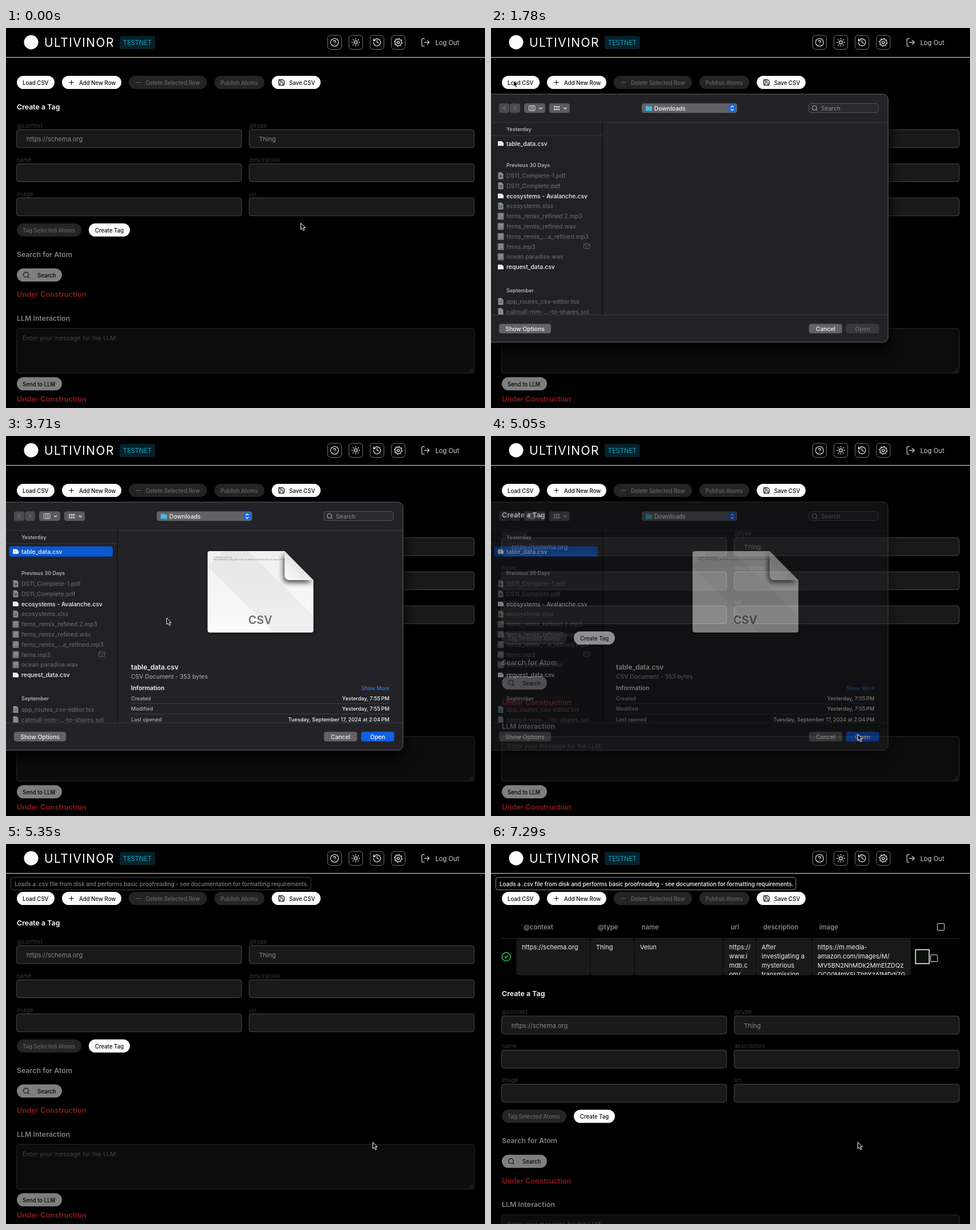
An HTML page that plays this animation: 839x667 px, repeating every 8000 ms.

```html
<!DOCTYPE html>
<html lang="en">
<head>
<meta charset="utf-8">
<title>CSV editor</title>
<style>
  html, body { margin: 0; width: 100%; height: 100%; overflow: hidden; background: #000; }
  svg { display: block; width: 839px; height: 667px; font-family: Inter, "Open Sans", sans-serif; }
  .icon { fill: none; stroke-width: 2; stroke-linecap: round; stroke-linejoin: round; }
  .panel { filter: drop-shadow(0 12px 12px #000); }
  .sheet { filter: drop-shadow(0 1px 2px rgba(0, 0, 0, .6)); }
  .flap { filter: drop-shadow(-2px 4px 5px rgba(0, 0, 0, .75)); }
</style>
</head>
<body>
<svg id="stage" viewBox="0 0 839 667" xmlns="http://www.w3.org/2000/svg"></svg>
<script>
const STEP = 148.6, LOOP = 8000;

// Drawing helpers; y of a text is the middle of its capitals.
const text = (x, y, s, size, fill, weight = 400, extra = '') =>
  `<text x="${x}" y="${y + size * 0.364}" font-size="${size}" fill="${fill}" font-weight="${weight}" ${extra}>${s}</text>`;
const rect = (x, y, w, h, r, fill, extra = '') =>
  `<rect x="${x}" y="${y}" width="${w}" height="${h}" rx="${r}" fill="${fill}" ${extra}/>`;
const path = (d, stroke, width = 1) =>
  `<path d="${d}" fill="none" stroke="${stroke}" stroke-width="${width}"/>`;
const icon = (cx, cy, size, stroke, body) =>
  `<g class="icon" stroke="${stroke}" transform="translate(${cx} ${cy}) scale(${size / 24}) translate(-12 -12)">${body}</g>`;
const group = (id, body) => `<g id="${id}">${body}</g>`;
const p = d => `<path d="${d}"/>`;
const ring = (r, c = 12) => `<circle cx="${c}" cy="${c}" r="${r}"/>`;

const gear = () => {
  const pts = [];
  for (let i = 0; i < 32; i++) {
    const a = (i + 0.5) * Math.PI / 16, r = i % 4 < 2 ? 10 : 7.6;
    pts.push(`${(12 + r * Math.sin(a)).toFixed(2)} ${(12 - r * Math.cos(a)).toFixed(2)}`);
  }
  return p(`M${pts.join('L')}Z`) + ring(3);
};

const icons = {
  help: ring(10) + p('M9.1 9a3 3 0 0 1 5.8 1c0 2-3 3-3 3M12 17h.01'),
  sun: ring(4) + p('M12 2v2M12 20v2M4.9 4.9l1.4 1.4M17.7 17.7l1.4 1.4M2 12h2M20 12h2M6.3 17.7l-1.4 1.4M19.1 4.9l-1.4 1.4'),
  history: p('M3 12a9 9 0 1 0 9-9 9.75 9.75 0 0 0-6.7 2.7L3 8M3 3v5h5M12 7v5l4 2'),
  gear: gear(),
  logout: p('M9 21H5a2 2 0 0 1-2-2V5a2 2 0 0 1 2-2h4M16 17l5-5-5-5M21 12H9'),
  save: p('M19 21H5a2 2 0 0 1-2-2V5a2 2 0 0 1 2-2h11l5 5v11a2 2 0 0 1-2 2zM17 21v-8H7v8M7 3v5h8'),
  search: ring(8, 11) + p('M21 21l-4.3-4.3'),
  plus: p('M5 12h14M12 5v14'),
  minus: p('M5 12h14'),
  loader: p('M21 12a9 9 0 1 1-6.2-8.56'),
  check: ring(10) + p('M8.5 12l2.5 2.5 5-5')
};

const looks = { light: ['#fff', '#0a0a0a'], off: ['#242424', '#686868'], dim: ['#7f7f7f', '#050505'] };
const pill = (x, y, w, label, look, tx, mark, id = '') => {
  const [bg, fg] = looks[look];
  return rect(x, y, w, 23, 11.5, bg, id && `id="${id}"`) +
    (mark ? icon(mark[1], y + 11.5, mark[2], fg, icons[mark[0]]) : '') +
    text(tx, y + 12, label, 9.65, fg, 500);
};

function header() {
  const tools = ['help', 'sun', 'history', 'gear'].map((name, i) => {
    const x = 575.5 + i * 37.2;
    return rect(x - 12, 13, 24, 24.5, 5, 'none', 'stroke="#777"') + icon(x, 25.2, 16.5, '#d8d8d8', icons[name]);
  }).join('');
  return '<circle cx="44" cy="25" r="12.5" fill="#fff"/>' +
    text(67, 25.3, 'ULTIVINOR', 21, '#fff', 400, 'letter-spacing="1.4"') +
    rect(199, 14, 62, 23, 4, '#06222b') + text(205, 26, 'TESTNET', 11.1, '#0fa5c4') +
    tools + icon(735, 25.3, 17.5, '#b8b8b8', icons.logout) + text(752, 26, 'Log Out', 11.2, '#d2d2d2') +
    rect(0, 51, 839, 1, 0, '#dcdcdc');
}

const toolbar = () =>
  pill(19, 84, 66, 'Load CSV', 'light', 29, null, 'load') +
  pill(98, 84, 104, 'Add New Row', 'light', 128, ['plus', 114.5, 13]) +
  pill(215, 84, 137, 'Delete Selected Row', 'off', 245, ['minus', 232, 14]) +
  pill(365, 84, 87.5, 'Publish Atoms', 'off', 375.5) +
  pill(465.5, 84, 85.5, 'Save CSV', 'light', 496, ['save', 482.5, 13]);

function form() {
  const fields = ['@context', '@type', 'name', 'description', 'image', 'url'].map((label, i) => {
    const x = i % 2 ? 426 : 18.7, y = 178.5 + (i >> 1) * 59.8;
    return text(x, y - 7, label, 9.6, '#353d4c', 400, 'letter-spacing=".3"') +
      rect(x, y, 394, 31.5, 4, '#191919', 'stroke="#4b4b4b"') +
      text(x + 17, y + 16.5, ['https://schema.org', 'Thing'][i] || '', 11, '#8a8a8a');
  }).join('');
  const wip = y => text(19, y, 'Under Construction', 12.8, '#8a1c1f', 600);
  return text(19, 138.5, 'Create a Tag', 12.4, '#fff', 600) + fields +
    pill(19, 343, 113, 'Tag Selected Atoms', 'off', 29) + pill(145, 343, 72, 'Create Tag', 'light', 156) +
    text(19, 397, 'Search for Atom', 12.4, '#808080', 600) +
    pill(19, 422, 79, 'Search', 'dim', 55, ['search', 35.5, 13]) + wip(467.5) +
    text(19, 509, 'LLM Interaction', 12.4, '#808080', 600) +
    rect(18.7, 527.5, 801.5, 78.5, 4, '#0c0c0c', 'stroke="#282828"') +
    text(29, 543.7, 'Enter your message for the LLM', 10.8, '#454545') +
    path('M810 604.5l8-8M814.5 604.5l3.5-3.5', '#555', 0.8) +
    pill(19, 613, 79, 'Send to LLM', 'dim', 29) + wip(651.8);
}

function table() {
  const cols = [
    [44, 130, '@context', ['https://schema.org']],
    [174, 77, '@type', ['Thing']],
    [251, 156, 'name', ['Velun']],
    [407, 57, 'url', ['https://', 'www.i', 'mdb.c', 'om/']],
    [464, 98, 'description', ['After', 'investigating a', 'mysterious', 'transmission']],
    [562, 174, 'image', ['https://m.media-', 'amazon.com/images/M/', 'MV5BN2NhMDk2MmEtZDQz', 'OC00MmY5LThhYzAtMDdiZG']]
  ];
  const cells = cols.map(([x, w, head, lines]) =>
    text(x + 13, 145.7, head, 11.2, '#9a9a9a', 500, 'letter-spacing=".1"') +
    rect(x + 0.3, 166.3, w - 0.6, 64, 4, '#191919') +
    '<g clip-path="url(#row)">' +
    lines.map((s, i) => text(x + 10, 180.7 + i * 16, s, 11, '#f2f2f2')).join('') + '</g>').join('');
  const box = (x, y) => rect(x, y, 12, 12, 1, 'none', 'stroke="#e8e8e8"');
  return rect(19, 165, 801, 1, 0, '#2c2c2c') + cells + box(782, 139.5) + box(770, 194.5) +
    rect(743.5, 185.5, 24, 24.5, 0, '#0a100a', 'stroke="#fff" stroke-width="1.5"') +
    group('spin', icon(0, 0, 18, '#2b66e6', icons.loader)) +
    group('done', icon(26.7, 198, 18, '#22c55e', icons.check));
}

const tooltip = () => rect(8.5, 58.5, 525.5, 22, 4, '#000', 'stroke="#8c8c8c"') +
  text(15, 70, 'Loads a .csv file from disk and performs basic proofreading - see documentation for formatting requirements.', 9.83, '#fff', 500);

const scrollbar = () => rect(833.5, 0, 5.5, 667, 0, '#1c1c1c') + rect(835.5, 1, 3, 562, 1.5, '#7a7a7a');

function fileList() {
  const white = '#f4f4f5', grey = '#66666a';
  const doc = (y, mark) => `<path d="M12.5 ${y - 6}h6l3 3v9h-9z" fill="#8a8a8d"/>` + rect(14.5, y - 1, 5, 4, 1, mark);
  const audio = y => rect(11.5, y - 6, 11, 12, 1, '#77777a') + path(`M15.5 ${y + 3}v-6l4-1v6`, '#aaa');
  const csv = y => `<path d="M12 ${y - 4}h7l3 3v5h-10z" fill="#fff"/>` + rect(14, y - 1, 4, 1, 0, '#aaa');
  const marks = {
    csv, mp3: audio, wav: audio,
    pdf: y => doc(y, '#5a5a5e'), xlsx: y => doc(y, '#2f8a48'),
    tsx: y => doc(y, '#4d7f8c'), sol: y => doc(y, '#8a8a8d')
  };
  const file = (name, y) => {
    const ext = name.split('.').pop();
    return marks[ext](y) + text(27, y, name, 10.35, ext === 'csv' ? white : grey, 500);
  };
  const month = ['DS11_Complete-1.pdf', 'DS11_Complete.pdf', 'ecosystems - Avalanche.csv', 'ecosystems.xlsx',
    'ferns_remix_refined 2.mp3', 'ferns_remix_refined.wav', 'ferns_remix_...a_refined.mp3', 'ferns.mp3',
    'ocean paradise.wav', 'request_data.csv'];
  const head = (s, y) => text(27, y, s, 9.05, '#b2b2b6', 600);
  return head('Yesterday', 178) + rect(0, 188.5, 195, 1, 0, '#3c3c40') +
    rect(5.5, 193.8, 181.5, 18, 4, '#0b58d2', 'id="pick"') + file('table_data.csv', 202.8) +
    head('Previous 30 Days', 240.3) + month.map((s, i) => file(s, 259.2 + i * 17.8)).join('') +
    rect(162.5, 379, 10.5, 8, 1, 'none', 'stroke="#66666a"') + path('M163 380l4.8 4 4.8-4', grey) +
    head('September', 461) + file('app_routes_csv-editor.tsx', 480) + file('catmull-rom-...-to-shares.sol', 497.8);
}

function preview() {
  const tiny = (y, s) => `<text x="363" y="${y}" font-size="2.9" fill="#777">${s}</text>`;
  const info = [['Created', 'Yesterday, 7:55\u2009PM'], ['Modified', 'Yesterday, 7:55\u2009PM'],
    ['Last opened', 'Tuesday, September 17, 2024 at 2:04\u2009PM']].map(([k, v], i) => {
    const y = 460.7 + i * 18.4;
    return text(219, y, k, 9.15, '#b0b0b4', 500) + text(671.5, y, v, 9.15, '#f4f4f5', 500, 'text-anchor="end"') +
      (i < 2 ? rect(219, y + 8.5, 453, 1, 0, '#424246') : '');
  }).join('');
  return '<use href="#page" class="sheet" fill="url(#paper)"/><g clip-path="url(#sheet)">' +
    '<path d="M353 229L380 202H424L538 316V341L534 345H469z" fill="#000" opacity=".045"/>' +
    tiny(214, 'context, type, name, url') +
    tiny(218, 'https://schema.org, Thing, name of the row, address, description of the row, image of the row, last') +
    '<path class="flap" d="M488 202L538.5 253H496a8 8 0 0 1-8-8z" fill="url(#flap)"/></g>' +
    text(445.5, 322.5, 'CSV', 19.5, '#6b6b6b', 600, 'text-anchor="middle" letter-spacing=".3"') +
    text(219, 406, 'table_data.csv', 11.8, '#f4f4f5', 600) +
    text(219, 422.7, 'CSV Document - 353 bytes', 10.4, '#b0b0b4') +
    text(219, 442, 'Information', 10.5, '#f4f4f5', 600) +
    text(671.5, 442.5, 'Show More', 9.1, '#3b8cf5', 400, 'text-anchor="end"') + info;
}

function dialog() {
  const button = (x, w, s, bg, fg, id = '') => `<g ${id && `id="${id}"`}>` + rect(x, 519.3, w, 16.7, 4, bg) +
    text(x + w / 2, 528, s, 10.3, fg, 500, 'text-anchor="middle"') + '</g>';
  const bar = (x, w, fill) => rect(x, 132.3, w, 16.7, 4, fill);
  const down = x => path(`M${x - 2.5} 139.5l2.5 2.5 2.5-2.5`, '#e0e0e2', 1.3);
  let dots = '';
  for (let i = 0; i < 6; i++) dots += rect(110 + i % 3 * 3.8, 137 + (i / 3 | 0) * 4.5, 2.8, 2.8, 0.5, '#d8d8da');
  const top = bar(14, 18, '#4b4b4f') + bar(33, 18, '#4b4b4f') +
    path('M24.5 137.5l-3 3.2 3 3.2M40.5 137.5l3 3.2-3 3.2', '#7a7a7e', 1.3) +
    bar(58, 37, '#5b5b5f') + rect(66.5, 136.5, 10.5, 8.5, 1, 'none', 'stroke="#e0e0e2"') +
    path('M70 136.5v8.5M73.5 136.5v8.5', '#e0e0e2') + down(87) +
    bar(102, 36, '#5b5b5f') + dots + down(130) +
    bar(264, 167, '#626266') + rect(271, 136, 5, 4, 1, '#2d9fce') + rect(271, 137.5, 11, 8, 1, '#46b8e6') +
    text(286, 140.8, 'Downloads', 10.3, '#f4f4f5', 500) + rect(416, 134, 13, 13.5, 3.5, '#1b66e2') +
    path('M420 139.3l2.5-2.5 2.5 2.5M420 142.3l2.5 2.5 2.5-2.5', '#fff', 1.3) +
    rect(556.5, 132.5, 122, 16, 4, '#2b2b2e', 'stroke="#57575b"') +
    icon(567, 140.8, 12, '#c8c8ca', icons.search) + text(578, 141.3, 'Search', 10.3, '#8c8c91');
  return rect(-20, 116, 715.5, 435.5, 9, '#232327', 'class="panel" stroke="#606064"') +
    rect(0, 166, 195, 337, 0, '#212125') + rect(0, 165.5, 695, 1, 0, '#3a3a3e') +
    rect(195, 166, 1, 337, 0, '#09090a') + rect(0, 502.8, 695, 1, 0, '#3e3e42') + top +
    '<g clip-path="url(#files)">' + fileList() + group('preview', preview()) + '</g>' +
    button(14, 91, 'Show Options', '#636367', '#f4f4f5') + button(557, 58, 'Cancel', '#636367', '#f4f4f5') +
    button(622, 58, 'Open', '#38383c', '#6f6f73') + button(622, 58, 'Open', '#1060e6', '#fff', 'open');
}

const pointers = () =>
  group('arrow', '<path d="M.5 .5V11.7L3 9.3 4.9 13.6 6.9 12.7 5 8.5H8.5z" fill="#000" stroke="#fff"/>') +
  group('hand', '<path d="M3.5 8V1.8a1.2 1.2 0 0 1 2.4 0V5l3.6 .8q1.7 .5 1.5 2.4L10.2 11.5V13H4.7V11.8L1 8.2q-.6-1.5 1-1.3z" fill="#fff" stroke="#000" stroke-width=".9"/>');

const stage = document.getElementById('stage');
stage.innerHTML = `<defs>
  <path id="page" d="M357 202H488L538.5 253V341a4 4 0 0 1-4 4H357a4 4 0 0 1-4-4V206a4 4 0 0 1 4-4z"/>
  <clipPath id="sheet"><use href="#page"/></clipPath>
  <clipPath id="row"><rect x="44" y="166" width="692" height="64"/></clipPath>
  <clipPath id="files"><rect y="166" width="695" height="337"/></clipPath>
  <linearGradient id="paper" x2="0" y2="1"><stop stop-color="#f0f0f0"/><stop offset="1" stop-color="#fbfbfb"/></linearGradient>
  <linearGradient id="flap" x1="0" y1="1" x2=".5" y2=".5"><stop stop-color="#fff"/><stop offset="1" stop-color="#e4e4e4"/></linearGradient>
  </defs>` + rect(0, 0, 839, 667, 0, '#000') + group('form', form()) + group('table', table()) + header() + toolbar() +
  group('tooltip', tooltip()) + group('dialog', dialog()) + group('scroll', scrollbar()) + group('cursor', pointers());

const el = id => stage.querySelector('#' + id);
const set = (id, name, value) => el(id).setAttribute(name, value);
const show = (id, on) => set(id, 'visibility', on ? 'inherit' : 'hidden');

// Pointer track: step, x, y.
const track = [
  [0, 516, 342], [4, 446, 288], [5, 262, 170], [6, 118, 96], [7, 52, 77], [8, 36, 93], [12, 39, 91.5],
  [16, 43, 112], [17, 56, 160], [18, 66, 197], [19, 67, 201],
  [23, 95, 214], [24, 182, 264], [25, 281, 319], [26, 402, 398], [27, 530, 487], [28, 612, 535],
  [29, 638, 525], [30, 642, 523]
];

function draw(time) {
  const n = Math.floor((time + 10) / STEP);
  const within = (a, b) => n >= a && n < b;
  const [, x, y] = track.filter(k => k[0] <= n).pop();
  const hover = within(8, 12), loaded = n >= 38;

  set('cursor', 'transform', `translate(${x} ${y})`);
  show('hand', hover);
  show('arrow', !hover);
  set('load', 'fill', hover ? '#c6c6c6' : '#fff');
  set('load', 'stroke', hover ? '#ededed' : 'none');

  // The panel and the tooltip each take one step to fade.
  show('dialog', within(12, 35));
  set('dialog', 'opacity', n < 34 ? 1 : 0.5);
  show('pick', n >= 19);
  show('preview', n >= 20);
  show('open', n >= 20);
  show('tooltip', n >= 36);
  set('tooltip', 'opacity', n > 36 ? 1 : 0.5);

  show('table', loaded);
  set('form', 'transform', `translate(0 ${loaded ? 123.5 : 0})`);
  show('scroll', within(38, 41));
  set('scroll', 'opacity', n < 40 ? 1 : 0.5);
  show('spin', loaded && n < 49);
  show('done', n >= 49);
  set('spin', 'transform', `translate(26.7 198) rotate(${(n * STEP - 5700) * 0.36})`);
}

function tick(now) {
  draw(now % LOOP);
  requestAnimationFrame(tick);
}
draw(0);
requestAnimationFrame(tick);
</script>
</body>
</html>
```
